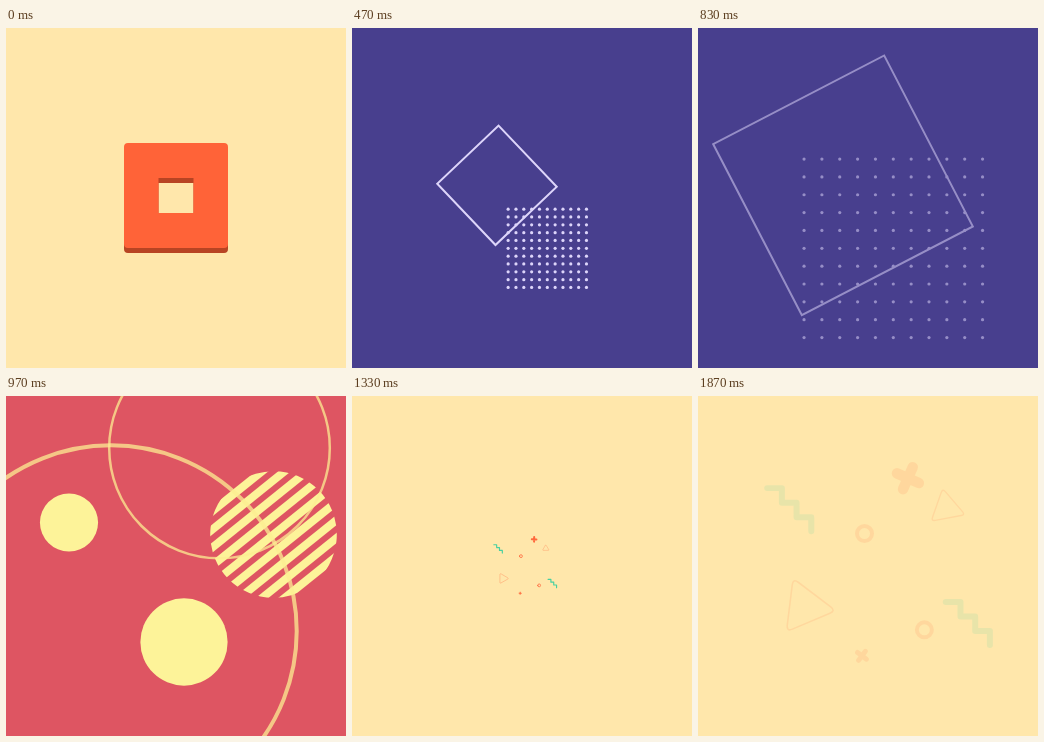
Animation of 340 by 340 pixels, one loop 1.91 s. Source, as an HTML page:

```html
<!DOCTYPE html>
<html lang="en">
<head>
<meta charset="utf-8">
<title>Shape loop</title>
<style>
  html, body { margin: 0; width: 100%; height: 100%; overflow: hidden; background: #ffe7ab; }
  svg { display: block; width: 100vw; height: 100vh; }
</style>
</head>
<body>
<svg id="stage" viewBox="0 0 340 340"></svg>
<script>
const LOOP = 1910;
const FRAME = 100 / 3;
const SCENE = 1300 / 3;
const ORANGE = '#ff6338';
const GREEN = '#3ecfa0';
const YELLOW = '#fdf399';
const LILAC = '#e4dcff';

const stage = document.getElementById('stage');

function add(parent, tag, attrs = {}) {
  const node = document.createElementNS('http://www.w3.org/2000/svg', tag);
  set(node, attrs);
  parent.append(node);
  return node;
}

function set(node, attrs) {
  for (const [name, value] of Object.entries(attrs)) node.setAttribute(name, value);
}

function addScene(background) {
  const scene = add(stage, 'g');
  add(scene, 'rect', { width: 340, height: 340, fill: background });
  return scene;
}

const clamp = (x) => Math.min(1, Math.max(0, x));
const expoOut = (p) => (p >= 1 ? 1 : 1 - 2 ** (-10 * p));
const powerOut = (p, power) => 1 - (1 - p) ** power;

// Button with a square hole
function buttonScene() {
  const scene = addScene('#ffe7ab');
  const d = 'M122 115H218Q222 115 222 119V216Q222 220 218 220H122Q118 220 118 216V119Q118 115 122 115Z'
    + 'M152.5 150H187.5V185H152.5Z';
  const style = { d, 'fill-rule': 'evenodd' };
  add(scene, 'path', { ...style, fill: '#b84423', transform: 'translate(0 5)' });
  const face = add(scene, 'path', { ...style, fill: ORANGE });
  return {
    scene,
    draw(t) {
      const press = t < 366 ? clamp(1.08 * Math.sin(Math.PI * t / 366)) : 0;
      set(face, { transform: `translate(0 ${5 * press})` });
    }
  };
}

// Turning outline over a spreading dot grid
function gridScene() {
  const scene = addScene('#483f8e');
  const marks = add(scene, 'g');
  const dots = [];
  for (let row = -5; row <= 5; row++) {
    for (let col = -5; col <= 5; col++) {
      dots.push({ row, col, node: add(marks, 'circle', { r: 1.6, fill: LILAC }) });
    }
  }
  const outline = add(marks, 'rect', { fill: 'none', stroke: LILAC, 'stroke-width': 2 });
  return {
    scene,
    draw(t) {
      const p = clamp(t / 400);
      const grow = expoOut(p);
      const side = 192.6 * grow;
      const step = 17.85 * grow;
      for (const { row, col, node } of dots) {
        set(node, { cx: 195.3 + col * step, cy: 220.3 + row * step });
      }
      set(outline, {
        x: -side / 2, y: -side / 2, width: side, height: side,
        transform: `translate(145 157.3) rotate(${-45 + 0.044 * t})`
      });
      set(marks, { opacity: 1 - 0.5 * p });
    }
  };
}

// Growing discs, fading rings and a striped disc
function circleScene() {
  const scene = addScene('#de5562');
  const discs = [[63, 126.5, 38.1], [178, 246, 57.2]].map(([cx, cy, size]) =>
    ({ size, node: add(scene, 'circle', { cx, cy, fill: YELLOW }) }));

  const clip = add(scene, 'clipPath', { id: 'disc' });
  add(clip, 'circle', { r: 63.3 });
  const striped = add(scene, 'g');
  const stripes = add(striped, 'g', { 'clip-path': 'url(#disc)' });
  for (let i = -4; i <= 4; i++) {
    add(stripes, 'rect', { x: -64, y: i * 14.1 - 4, width: 128, height: 8, fill: YELLOW });
  }

  const rings = [[105, 235, 225.6, 4], [213.5, 52, 134, 2.5]].map(([cx, cy, size, width]) =>
    ({ size, node: add(scene, 'circle', { cx, cy, fill: 'none', stroke: '#fdee92', 'stroke-width': width }) }));
  return {
    scene,
    draw(t) {
      const p = clamp(t / 400);
      for (const { size, node } of discs) set(node, { r: size * powerOut(p, 5) });
      for (const { size, node } of rings) set(node, { r: size * expoOut(p), opacity: 1 - p });
      set(striped, { transform: `translate(267.5 138.5) rotate(${-45 + 0.062 * t})` });
    }
  };
}

function roundedTriangle(radius, angle) {
  const corners = [0, 120, 240].map((turn) => {
    const a = (angle + turn) * Math.PI / 180;
    return [radius * Math.cos(a), radius * Math.sin(a)];
  });
  const mix = (a, b, k) => a.map((v, i) => (v + (b[i] - v) * k).toFixed(2)).join(' ');
  return corners.map((c, i) => {
    const before = corners[(i + 2) % 3];
    const after = corners[(i + 1) % 3];
    return `${i ? 'L' : 'M'}${mix(c, before, 0.12)}Q${mix(c, c, 0)} ${mix(c, after, 0.12)}`;
  }).join('') + 'Z';
}

const cross = (arm) => `M${-arm} 0H${arm}M0 ${-arm}V${arm}`;
const ring = 'M-7.5 0A7.5 7.5 0 1 1 7.5 0A7.5 7.5 0 1 1 -7.5 0Z';
const zigzag = 'M-22 -22h14.7v14.6h14.7v14.6h14.7v14';

// Confetti thrown from the centre
function confettiScene() {
  const scene = addScene('#ffe7ab');
  // x and y offset, path, colour, line width, final turn
  const pieces = [
    [-79, -56, zigzag, GREEN, 6, 0],
    [100, 58, zigzag, GREEN, 6, 0],
    [-63, 41, roundedTriangle(31, 0), ORANGE, 1.6, 8],
    [78.5, -58, roundedTriangle(20, -90), ORANGE, 1.4, -12],
    [40, -88, cross(12), ORANGE, 10.5, 27],
    [-6, 90, cross(5.6), ORANGE, 5, 42],
    [-3.5, -32.5, ring, ORANGE, 4, 0],
    [56.5, 64, ring, ORANGE, 4, 0]
  ].map(([x, y, d, stroke, width, turn]) => {
    const holder = add(scene, 'g');
    const node = add(holder, 'path', {
      d, stroke, fill: 'none', 'stroke-width': width,
      'stroke-linecap': 'round', 'stroke-linejoin': 'round'
    });
    return { x, y, turn, holder, node };
  });
  return {
    scene,
    draw(t) {
      const p = clamp(t / 640);
      const move = expoOut(p);
      const grow = powerOut(p, 4);
      for (const { x, y, turn, holder, node } of pieces) {
        set(holder, { opacity: 1 - p });
        set(node, {
          transform: `translate(${170 + x * move} ${170 + y * move}) scale(${grow}) rotate(${turn * p})`
        });
      }
    }
  };
}

const scenes = [buttonScene(), gridScene(), circleScene(), confettiScene()];

function render(time) {
  const t = Math.floor((time % LOOP + 3.5) / FRAME) * FRAME;
  const current = Math.min(3, Math.floor((t + 1) / SCENE));
  scenes.forEach(({ scene }, i) => set(scene, { display: i === current ? 'inline' : 'none' }));
  scenes[current].draw(Math.max(0, t - current * SCENE));
}

const start = performance.now();
function tick() {
  render(performance.now() - start);
  requestAnimationFrame(tick);
}
tick();
</script>
</body>
</html>
```
